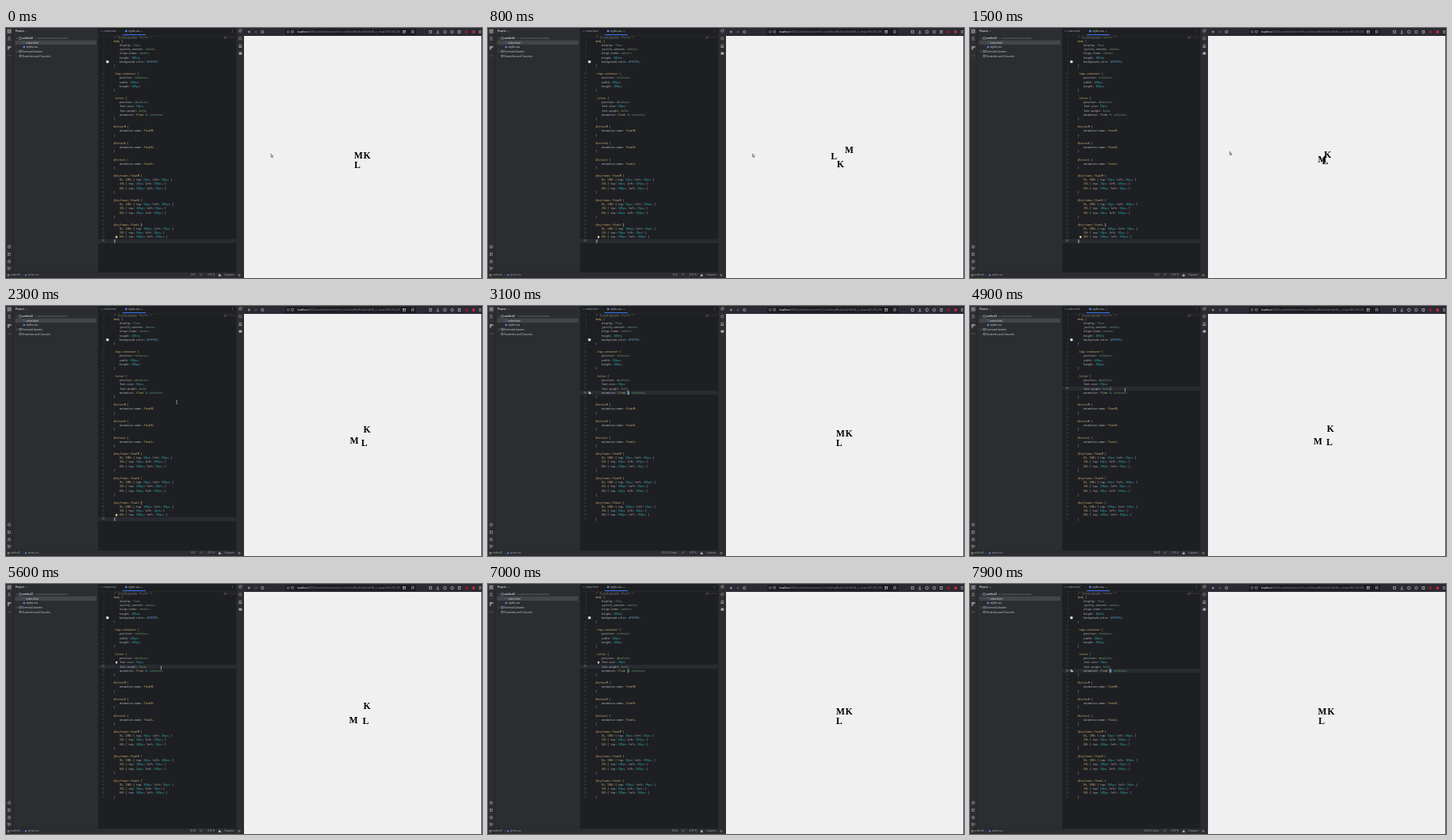
Write an HTML page with a canvas that moves like this. It is 600 by 316 pixels and loops after 8000 ms.

```html
<!DOCTYPE html>
<html lang="en">
<head>
<meta charset="utf-8">
<title>Floating letters</title>
<style>
html, body { margin: 0; width: 100%; height: 100%; overflow: hidden; background: #1e1f22; }
canvas { display: block; width: 600px; height: 316px; }
</style>
</head>
<body>
<canvas id="stage"></canvas>
<script>
const W = 600, H = 316, LOOP = 8000;
const canvas = document.getElementById('stage');
const dpr = window.devicePixelRatio || 1;
canvas.width = W * dpr;
canvas.height = H * dpr;
const ctx = canvas.getContext('2d');

const MONO = '"DejaVu Sans Mono", monospace';
const SANS = 'Inter, sans-serif';
const SERIF = '"Liberation Serif", serif';
const CHAR = 1.89, LINE = 5.156, CODE_X = 135.7, CODE_Y = 11.7;
const C = {
  plain: '#bcbec4', sel: '#d5b778', value: '#6aab73', num: '#2aacb8',
  key: '#d0a56f', dim: '#7a7e85', gutter: '#4b5059', icon: '#a8abb2'
};

const source = `/* Grundlegendes Styles */
body {
    display: flex;
    justify-content: center;
    align-items: center;
    height: 100vh;
    background-color: #F0F0F0;
}

.logo-container {
    position: relative;
    width: 200px;
    height: 200px;
}

.letter {
    position: absolute;
    font-size: 50px;
    font-weight: bold;
    animation: float 3s infinite;
}

#letterM {
    animation-name: floatM;
}

#letterK {
    animation-name: floatK;
}

#letterL {
    animation-name: floatL;
}

@keyframes floatM {
    0%, 100% { top: 50px; left: 50px; }
    33% { top: 20px; left: 100px; }
    66% { top: 100px; left: 20px; }
}

@keyframes floatK {
    0%, 100% { top: 50px; left: 100px; }
    33% { top: 100px; left: 50px; }
    66% { top: 20px; left: 100px; }
}

@keyframes floatL {
    0%, 100% { top: 100px; left: 50px; }
    33% { top: 50px; left: 20px; }
    66% { top: 100px; left: 100px; }
}`.split('\n');

// [left, top] at 0 %, 33 % and 66 %
const letters = {
  M: [[50, 50], [100, 20], [20, 100]],
  K: [[100, 50], [50, 100], [100, 20]],
  L: [[50, 100], [20, 50], [100, 100]]
};

function rect(x, y, w, h, color) {
  ctx.fillStyle = color;
  ctx.fillRect(x, y, w, h);
}

function text(str, x, y, color, size = 3.1, font = SANS, weight = '') {
  ctx.save();
  ctx.translate(x, y);
  ctx.scale(0.1, 0.1);
  ctx.font = `${weight} ${size * 10}px ${font}`;
  ctx.textBaseline = 'alphabetic';
  ctx.fillStyle = color;
  ctx.fillText(str, 0, size * 3.6);
  ctx.restore();
}

function path(points, color = C.icon, width = 0.6) {
  ctx.beginPath();
  for (let i = 0; i < points.length; i += 2) ctx.lineTo(points[i], points[i + 1]);
  ctx.strokeStyle = color;
  ctx.lineWidth = width;
  ctx.stroke();
}

function box(x, y, s, color = C.icon) {
  ctx.strokeStyle = color;
  ctx.lineWidth = 0.6;
  ctx.strokeRect(x - s / 2, y - s / 2, s, s);
}

function ring(x, y, r, color = C.icon) {
  ctx.beginPath();
  ctx.arc(x, y, r, 0, 7);
  ctx.strokeStyle = color;
  ctx.lineWidth = 0.6;
  ctx.stroke();
}

function disc(x, y, r, color) {
  ctx.beginPath();
  ctx.arc(x, y, r, 0, 7);
  ctx.fillStyle = color;
  ctx.fill();
}

const chevron = (x, y, d = 1, c = C.icon) => path([x - 1, y - d / 2, x, y + d / 2, x + 1, y - d / 2], c, 0.5);
const lineY = n => CODE_Y + (n - 1) * LINE;

// CSS "ease": cubic-bezier(.25, .1, .25, 1)
function ease(x) {
  let lo = 0, hi = 1, s = x;
  const bez = (a, b, u) => 3 * a * u * (1 - u) ** 2 + 3 * b * u * u * (1 - u) + u ** 3;
  for (let i = 0; i < 24; i++) {
    s = (lo + hi) / 2;
    if (bez(0.25, 0.25, s) < x) lo = s; else hi = s;
  }
  return bez(0.1, 1, s);
}

// A new duration keeps the elapsed time, so the phase jumps.
function phase(t) {
  const age = 2.86 + t / 1000;
  if (t < 3600) return age / 3 % 1;
  if (t < 7500) return age / 5 % 1;
  return (age + 0.16) % 1;
}

function place(stops, p) {
  const marks = [0, 0.33, 0.66, 1];
  const i = p < 0.33 ? 0 : p < 0.66 ? 1 : 2;
  const u = ease((p - marks[i]) / (marks[i + 1] - marks[i]));
  const a = stops[i], b = stops[(i + 1) % 3];
  return a.map((v, k) => v + (b[k] - v) * u);
}

function colorOf(token, line, col) {
  if (line.startsWith('/*')) return C.dim;
  if (token === '@keyframes') return C.key;
  if (!line.startsWith(' ')) return /[{}]/.test(token) ? C.plain : C.sel;
  if (token.endsWith('%')) return C.sel;
  if (/^#|^\d/.test(token)) return token[0] === '#' ? '#5a9bd5' : C.num;
  if (/[;:{},\s]/.test(token)) return C.plain;
  if (col > line.indexOf(':') && !line.includes('%')) {
    return /^float/.test(token) ? C.sel : C.value;
  }
  return C.plain;
}

function drawCode(t, row) {
  source.forEach((raw, i) => {
    const n = i + 1, y = lineY(n);
    const line = n === 20 && t >= 3300 ? raw.replace('3s', '5s') : raw;
    const num = String(n);
    text(num, 124 - num.length * 1.5, y, n === row ? C.icon : C.gutter, 2.5, MONO);
    for (const m of line.matchAll(/[@#.]?[\w-]+%?|[^\s\w]/g)) {
      text(m[0], CODE_X + m.index * CHAR, y, colorOf(m[0], line, m.index), 3.14, MONO);
    }
  });
  path([141, 13.6, 165, 13.6], '#5c6168', 0.3);
  rect(126.4, 41.2, 3, 3, '#f0f0f0');
}

function bulb(x, y) {
  disc(x, y - 0.4, 1.2, '#f0dc9a');
  rect(x - 0.6, y + 0.9, 1.2, 0.8, '#ced0d6');
}

function drawEditor(t) {
  const row = t < 2700 ? 51 : t < 4300 ? 20 : t < 7400 ? 19 : 20;
  rect(116, 0, 174, 309, '#1e1f22');
  rect(116, lineY(row) - 2.6, 174, LINE, '#282b31');
  if (row === 51) {
    rect(CODE_X + 18 * CHAR, lineY(47) - 2.4, CHAR, 4.8, '#43454a');
    rect(CODE_X, lineY(51) - 2.4, CHAR, 4.8, '#43454a');
  }
  const digitX = CODE_X + 21 * CHAR;
  if (row === 20) rect(digitX, lineY(20) - 2.5, CHAR, 5, '#214283');
  drawCode(t, row);

  if (row === 51) {
    rect(CODE_X + CHAR, lineY(51) - 2.3, 0.4, 4.6, '#ced0d6');
    bulb(139.3, lineY(50));
  } else if (row === 20) {
    rect(digitX + CHAR, lineY(20) - 2.3, 0.4, 4.6, '#ced0d6');
    rect(126.6, lineY(20) - 1.5, 2, 3, C.icon);
    disc(129, lineY(20) + 0.6, 1, '#ced0d6');
  } else {
    if (t % 1000 > 650) rect(CODE_X + 22 * CHAR, lineY(19) - 2.3, 0.4, 4.6, '#ced0d6');
    if (t > 5200) bulb(139.3, lineY(18));
  }

  // tabs and inspection badge
  text('<>', 118.8, 3.9, '#548af7', 2.8, MONO);
  text('index.html', 123.6, 3.9, C.icon);
  disc(151.4, 3.9, 1.3, '#548af7');
  text('styles.css', 154.2, 3.9, '#ced0d6');
  text('×', 170.5, 3.9, C.icon);
  rect(147, 8, 29, 1, '#3574f0');
  rect(116, 9, 174, 0.3, '#393b40');
  for (const d of [-1.2, 0, 1.2]) disc(285.6, 3.9 + d, 0.35, C.icon);
  path([274.6, 13, 276, 10.7, 277.4, 13, 274.6, 13], '#a89058', 0.4);
  text('1', 278.6, 12, C.dim, 2.8);
  chevron(283, 12, -1, C.dim);
  chevron(287, 12, 1, C.dim);

  const pos = row === 51 ? ['51:2', 233] : row === 19 ? ['19:23', 232] : ['20:23 (1 char)', 219];
  text(pos[0], pos[1], 312.4, C.icon, 2.9);
}

function drawTree() {
  rect(0, 0, 300, H, '#2b2d30');
  rect(8.7, 0, 0.4, 309, '#1e1f22');
  text('Project', 12, 4, '#dfe1e5', 3.1, SANS, '600');
  chevron(25.5, 4.2);
  rect(11.5, 15.6, 102.5, 5.5, '#43454a');
  chevron(14, 13);
  box(18, 13, 2.4);
  text('untitled3', 20.5, 13, '#dfe1e5', 3.1, SANS, '600');
  text('C:\\Users\\demo\\Projects\\untitled3', 36.5, 13, C.dim, 2.6);
  text('<>', 21, 18.4, '#548af7', 2.6, MONO);
  text('index.html', 25.5, 18.4, '#dfe1e5');
  disc(22.8, 24, 1.3, '#548af7');
  text('styles.css', 25.5, 24, '#dfe1e5');
  path([13.4, 28.7, 14.4, 29.7, 13.4, 30.7], C.icon, 0.5);
  box(18, 29.7, 2.2);
  text('External Libraries', 20.5, 29.7, '#ced0d6');
  box(18, 35.4, 2.2);
  text('Scratches and Consoles', 20.5, 35.4, '#ced0d6');

  // left tool strip
  rect(1, 1, 6.4, 6.4, '#4e5157');
  box(4.2, 4.2, 2.8, '#ced0d6');
  ring(4, 12.3, 1.2);
  path([1.8, 15, 6.2, 15]);
  rect(2, 18.8, 4.4, 0.4, '#4e5157');
  box(3, 24, 1.6); box(5.4, 24, 1.6); box(3, 26.4, 1.6);
  for (const d of [-1.5, 0, 1.5]) disc(4.2 + d, 35, 0.45, C.icon);
  ring(4, 276.5, 1.8);
  path([3.4, 275.6, 4.9, 276.5, 3.4, 277.4], C.icon, 0.5);
  box(4, 286, 3.2);
  path([3, 285.4, 3.8, 286, 3, 286.7], C.icon, 0.5);
  ring(4, 295.2, 1.8);
  path([4, 294, 4, 296.2]);
  ring(2.8, 302.8, 0.8); ring(5.3, 303.4, 0.8);
  path([2.8, 303.6, 2.8, 306.2, 5.3, 304.2]);
}

function drawStatus() {
  rect(0, 309, 300, 7, '#2b2d30');
  rect(0, 308.8, 300, 0.3, '#1e1f22');
  box(3, 312.4, 1.8);
  text('untitled3', 5.5, 312.4, C.icon, 2.9);
  text('›', 20.6, 312.4, C.icon, 2.9);
  disc(25, 312.4, 1.1, '#548af7');
  text('styles.css', 27.5, 312.4, C.icon, 2.9);
  text('LF', 244.5, 312.4, C.icon, 2.9);
  text('UTF-8', 254, 312.4, C.icon, 2.9);
  ring(269.3, 311.8, 0.9);
  rect(267.9, 312, 2.8, 2, C.icon);
  text('4 spaces', 275, 312.4, C.icon, 2.9);
  ring(294, 312.4, 1.1);
}

function drawRightStrip() {
  rect(290, 0, 10, 309, '#2b2d30');
  rect(290, 0, 0.4, 309, '#1e1f22');
  ring(295.3, 3.6, 1.6, '#ced0d6');
  disc(296.8, 2.2, 0.8, '#db5c5c');
  ring(295.3, 13.2, 1.7);
  ring(295.3, 22.4, 1.5, '#ced0d6');
  path([293.3, 24.4, 297.3, 24.4], '#ced0d6');
  rect(293.5, 30.6, 3.8, 3, C.icon);
}

function drawBrowser(t) {
  const ink = '#dddce4';
  rect(300, 0, 300, 10, '#2b2a33');
  rect(300, 10, 299, H - 10, '#f0f0f0');
  rect(599, 10, 1, H - 10, '#55545a');
  path([306.8, 3.4, 305.2, 4.9, 306.8, 6.4], ink);
  path([305.2, 4.9, 308, 4.9], ink);
  path([314.6, 3.4, 316.2, 4.9, 314.6, 6.4], '#75747c');
  path([313.2, 4.9, 316, 4.9], '#75747c');
  ring(323.3, 4.9, 1.6, ink);
  rect(352, 1.2, 165, 7.4, '#1c1b22');
  ring(355.6, 4.8, 1.4, C.icon);
  box(361, 4.8, 2.4);
  text('localhost', 367, 4.9, '#fbfbfe', 3.2);
  text(':63342/untitled3/index.html?_ijt=k7m2vq94hd1s0ctb5n8r3&_ij_reload=RELOAD_ON_SAVE',
    380.8, 4.9, '#8f8e98', 2.95);
  rect(497, 1.2, 20, 7.4, '#1c1b22');
  box(502, 4.8, 2.8, ink);
  path([501, 4.2, 503, 4.2], ink, 0.5);
  path([511.5, 6.4, 511.5, 3.2, 514, 3.2, 514, 6.4, 512.7, 5.4, 511.5, 6.4], ink, 0.5);
  box(535.2, 4.9, 2.8, ink);
  path([544.3, 2.8, 544.3, 5.5], ink);
  chevron(544.3, 5.1, 1, ink);
  path([542.6, 6.8, 546, 6.8], ink);
  ring(553.3, 4.9, 1.8, ink);
  ring(562.4, 4.9, 1.7, ink);
  box(571.4, 4.9, 2.8, ink);
  disc(580.4, 4.9, 1.9, '#8a1f2e');
  disc(589.4, 4.9, 1.9, '#c4283c');
  for (const d of [-1.4, 0, 1.4]) path([596, 4.9 + d, 599, 4.9 + d], ink, 0.5);

  const p = phase(t), k = W / 2560;
  for (const name in letters) {
    const [x, y] = place(letters[name], p);
    text(name, 438.8 + (x - 50) * k, 160.6 + (y - 50) * k, '#000', 11.72, SERIF, 'bold');
  }
}

const track = [
  [0, 334, 159.2], [700, 334, 159.2], [1300, 327.3, 156.2], [1900, 327.3, 156.2],
  [2500, 176.5, 109.6], [3500, 176.5, 109.6], [4100, 195.5, 106],
  [6200, 195.5, 106], [6800, 176.8, 109.8], [8000, 176.8, 109.8]
];

function drawPointer(t) {
  const i = track.findIndex(k => k[0] > t);
  const a = track[i - 1], b = track[i];
  const u = (t - a[0]) / (b[0] - a[0]), s = u * u * (3 - 2 * u);
  const x = a[1] + (b[1] - a[1]) * s, y = a[2] + (b[2] - a[2]) * s;
  if (x > 290) {
    ctx.beginPath();
    for (const [dx, dy] of [[0, 0], [0, 4], [0.9, 3.2], [1.6, 4.6], [2.1, 4.3], [1.5, 3], [2.7, 2.9]]) {
      ctx.lineTo(x + dx, y + dy);
    }
    ctx.closePath();
    ctx.fillStyle = '#fff';
    ctx.fill();
    ctx.strokeStyle = '#000';
    ctx.lineWidth = 0.45;
    ctx.stroke();
  } else {
    path([x, y - 2, x, y + 2], '#dfe1e5', 0.5);
    path([x - 0.8, y - 2, x + 0.8, y - 2], '#dfe1e5', 0.4);
    path([x - 0.8, y + 2, x + 0.8, y + 2], '#dfe1e5', 0.4);
  }
}

function draw(t) {
  ctx.setTransform(dpr, 0, 0, dpr, 0, 0);
  drawTree();
  drawStatus();
  drawEditor(t);
  drawRightStrip();
  drawBrowser(t);
  drawPointer(t);
}

const start = performance.now();
function tick() {
  draw((performance.now() - start) % LOOP);
  requestAnimationFrame(tick);
}
tick();
</script>
</body>
</html>
```
